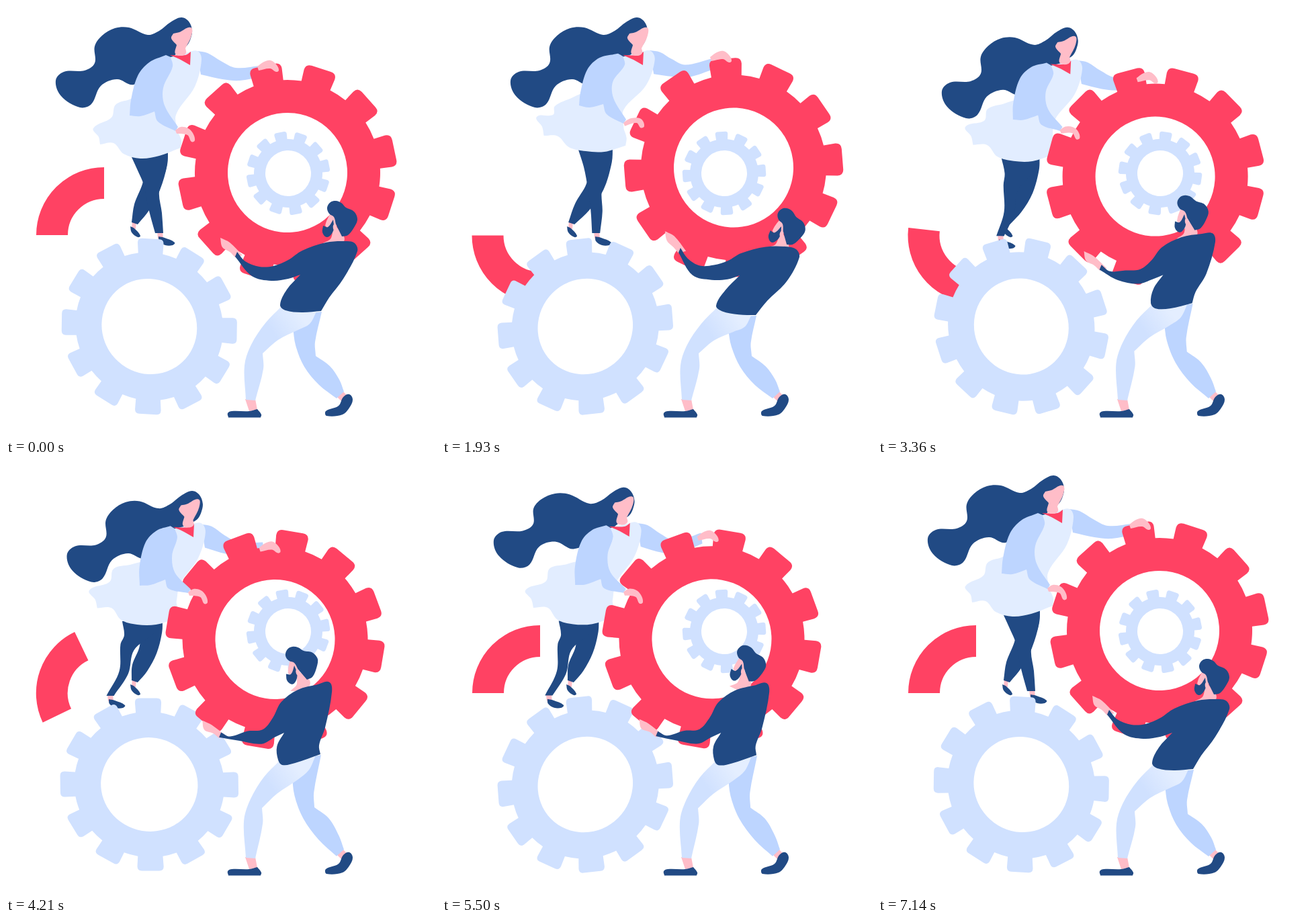
Recreate the animation shown at these times as an HTML page. Size 640x640 px, loop 7.21 s.

```html
<!DOCTYPE html>
<html lang="en">
<head>
<meta charset="utf-8">
<title>Turning gears</title>
<style>
html, body { margin: 0; width: 100%; height: 100%; overflow: hidden; background: #fff; }
svg { display: block; width: 100%; height: 100%; }
</style>
</head>
<body>
<svg id="stage" viewBox="0 0 640 640">
  <defs>
    <linearGradient id="thigh" gradientUnits="userSpaceOnUse" x1="396" y1="484" x2="436" y2="456">
      <stop offset="0" stop-color="#d0e1ff"/><stop offset="1" stop-color="#e4eeff"/>
    </linearGradient>
  </defs>
</svg>
<script>
const LOOP = 7210, TURN = 7140;
const NAVY = '#214a84', RED = '#ff4263', SKIN = '#ffbdc8',
      GEAR = '#d0e1ff', DRESS = '#e2edff', SLEEVE = '#bdd5ff';
const stage = document.getElementById('stage');
const parts = [];

function add(tag, attrs, parent = stage) {
  const el = document.createElementNS(stage.namespaceURI, tag);
  for (const name in attrs) el.setAttribute(name, attrs[name]);
  return parent.appendChild(el);
}

// Joint: rest position, then its offset when leaning right, leaning left, and
// (if different) leaning left with the hair blown up.
const joints = {
  // woman
  head: [265, 40, 29, 0, 16, 23, 10, 19],
  hairTip: [95, 120, 28, 0, 17, 25, 3, 3],
  face: [262, 50, 30, 0, 11.5, 20.5, 8.5, 17.5],
  neck: [260, 74, 25, 0, 5, 21],
  shoulder: [290, 88, 26, 0, 6, 22],
  farElbow: [330, 98, 19, -4, 6, 25],
  farCuff: [379, 97, 24, -11, 4, 28, 8, 14],
  farHand: [390, 90, 25, -14, 2.5, 35, 6, 19],
  upperArm: [189, 125, 20, -9, 11, 11],
  elbow: [184, 163, 20, -15, 15, 18],
  crook: [221, 157, 19, -11, 16, 15],
  wrist: [254, 185, 18, -11, 19, 6],
  fingers: [280, 198, 20, -21, 19, 6],
  skirtTip: [130, 182, 11, -17, -6, 6],
  skirtTop: [163, 147, 5, 2, -3, 9],
  skirtHem: [195, 227, 14, -11, -5, 12],
  hipLeft: [188, 226, 16, -11, -14, 9],
  hipRight: [250, 212, 13, -3, -8, 19],
  farKnee: [210, 270, 12, 0, -4, 7],
  farAnkle: [191, 324, 1, 0, 0, 0],
  nearKnee: [217, 280, 10, -2, -38, 0],
  nearFoot: [230, 342, 1, 0, -74, 7],
  // man
  palm: [325, 352, 13, -10, -27, 37],
  cuff: [342, 370, 11, -6, -24, 34],
  forearm: [396, 398, 7, -2, -14, 10],
  armpit: [438, 400, 5, 1, -24, 0],
  chest: [460, 356, 2, 5, -36, -14],
  nape: [490, 355, 8, 8, -51, -18],
  back: [520, 357, 9, 10, -38, -29],
  waist: [500, 407, 11, 4, -27, -14],
  hemRight: [469, 455, -2, 6, -1, -22],
  hemLeft: [409, 446, 0, 1, -3, -5],
  knee: [461, 521, 0, 0, -2, -10],
  shin: [382, 517, 0, 0, -1, -5],
  ankle: [364, 587, 0, 0, 0, 0],
  heel: [498, 579, 0, 0, 0, 0]
};

// Points are "x,y"; a trailing * marks a corner, all others are smooth.
const parse = text => text.split(' ').map(item => {
  const [x, y] = item.split(',').map(parseFloat);
  return { x, y, corner: item.endsWith('*') };
});

function control(p, prev, next, other, length) {
  if (p.corner) return `${p.x + (other.x - p.x) / 3} ${p.y + (other.y - p.y) / 3}`;
  const size = Math.hypot(next.x - prev.x, next.y - prev.y) || 1;
  const k = (other === next ? length : -length) / 3 / size;
  return `${p.x + (next.x - prev.x) * k} ${p.y + (next.y - prev.y) * k}`;
}

function outline(points) {
  const n = points.length, at = i => points[(i + n) % n];
  let d = `M${points[0].x} ${points[0].y}`;
  for (let i = 0; i < n; i++) {
    const a = at(i), b = at(i + 1), length = Math.hypot(b.x - a.x, b.y - a.y);
    d += `C${control(a, at(i - 1), b, b, length)} ${control(b, a, at(i + 2), a, length)} ${b.x} ${b.y}`;
  }
  return d + 'Z';
}

// Each point follows the joints, the nearest ones most.
function follow(p, names, pose) {
  let sum = 0, dx = 0, dy = 0;
  for (const name of names) {
    const [x, y, ...offsets] = joints[name];
    const i = pose < 3 || offsets.length > 4 ? 2 * pose - 2 : 2;
    const weight = 1 / (1 + (p.x - x) ** 2 + (p.y - y) ** 2);
    sum += weight;
    dx += weight * offsets[i];
    dy += weight * offsets[i + 1];
  }
  return { ...p, x: p.x + dx / sum, y: p.y + dy / sum };
}

const still = (fill, text, parent) => add('path', { fill, d: outline(parse(text)) }, parent);

function part(fill, names, text) {
  const rest = parse(text), list = names.split(' ');
  const poses = [rest, ...[1, 2, 3].map(pose => rest.map(p => follow(p, list, pose)))];
  parts.push({ el: add('path', { fill }), poses });
}

function gear(fill, body, tip, base, top, round, hole) {
  const foot = Math.sqrt(body * body - base * base);
  let d = '';
  for (let i = 0; i < 12; i++) {
    const c = Math.cos(i * Math.PI / 6), s = Math.sin(i * Math.PI / 6);
    const at = (x, y) => `${x * c - y * s} ${x * s + y * c}`;
    d += (i ? `A${body} ${body} 0 0 1 ` : 'M') + at(foot, -base) +
      `L${at(tip - round, -top)}Q${at(tip, -top)} ${at(tip, round - top)}` +
      `L${at(tip, top - round)}Q${at(tip, top)} ${at(tip - round, top)}L${at(foot, base)}`;
  }
  d += `A${body} ${body} 0 0 1 ${foot} ${-base}Z` +
    `M${hole} 0A${hole} ${hole} 0 1 0 ${-hole} 0A${hole} ${hole} 0 1 0 ${hole} 0Z`;
  return add('path', { fill, d, 'fill-rule': 'evenodd' });
}

const arc = add('path', { d: 'M68.5 341A77.5 77.5 0 0 1 146 263.5', fill: 'none', stroke: RED, 'stroke-width': 47 });

// woman, behind the gears
part(NAVY, 'head hairTip', '277,36 272,23 261,17 245,24 228,37 211,43 183,32 162,33 143,44 132,60 132,85 117,96 86,98 74,111 82,134 110,151 127,146 141,119 165,109 190,117 225,95 262,64 270,58 275,48');
part(SLEEVE, 'shoulder farElbow farCuff', '284,67* 300,70 320,82 342,92 378,89* 380,105* 348,111 322,109 290,102*');
part(SKIN, 'farAnkle', '188,320* 194,321* 193,332* 187,331*');
part(NAVY, 'farAnkle', '185,328* 191,331 200,342 196,344 187,337');
part(NAVY, 'hipLeft hipRight farKnee farAnkle', '213,222* 203,265 191,295 187,322* 196,325* 213,304 229,274 240,236 241,212*');
part(SKIN, 'nearFoot', '225,335* 233,335* 234,347* 226,346*');
part(NAVY, 'nearFoot', '227,343* 236,345 251,352 248,356 237,356 228,350');
part(NAVY, 'hipLeft hipRight nearKnee nearFoot', '187,225* 197,247 205,266 213,305 222,338* 234,338* 232,308 228,276 239,240 241,212*');
part(DRESS, 'neck shoulder crook skirtTop skirtTip skirtHem hipRight', '268,70* 285,67 291,80 281,120 253,162 256,188* 261,200 260,211* 228,223 200,227 175,220 160,204 140,206* 138,195 130,182 157,166 163,147 184,139* 220,120 245,76*');
part(RED, 'neck', '244,73* 267,73 275,68* 274,88* 260,80');
part(SKIN, 'face', '258,39 275,32 276,44 267,63* 268,70 262,74 252,71 254,58* 246,48 249,41*');

const blueGear = gear(GEAR, 110, 130.5, 18.3, 19.3, 6.5, 71);
const smallGear = gear(GEAR, 51, 62, 8.5, 9.3, 3.5, 34);
const redGear = gear(RED, 138, 162.5, 22.5, 24, 9, 89);

// woman, in front of the gears
part(SLEEVE, 'neck upperArm elbow crook wrist', '238,73* 213,84 196,104 186,140 184,163* 200,164 221,157* 226,172 252,186* 256,180* 236,148 234,122 248,90 245,76*');
part(SKIN, 'wrist fingers', '252,185* 260,180 271,182 278,189 281,200 276,202 270,192 254,190*');
part(SKIN, 'farHand', '374,90* 384,83 394,81 403,88 406,96 402,98 393,93 376,96*');

// man
still(SKIN, '493,582* 501,573* 508,580* 500,589*');
still(NAVY, '476,603 495,595 502,582 511,578 516,586 511,598 501,608 477,610');
still(SKIN, '356,585* 371,585* 374,601* 362,603*');
still(NAVY, '330,606 336,603 362,603 374,600* 380,608 379,612.5* 331,612.5*');
part(SLEEVE, 'hemRight knee heel', '427,478* 431,505 444,537 466,564 492,584* 503,574* 496,556 482,536 461,521* 460,500 470,455* 435,460');
part('url(#thigh)', 'hemLeft hemRight shin ankle', '410,447* 386,472 365,504 355,535 357,586* 371,587* 383,540 382,517* 405,497 435,482 452,473 462,455*');
part(SKIN, 'palm cuff', '319,345* 333,352 352,371* 341,374* 333,366 322,359');
const head = add('g', {});
still(SKIN, '486,322* 503,343 502,352 490,358 472,353* 484,345', head);
still(SKIN, '482,310* 490,314 490,330 484,335 475,327* 477,320', head);
still(NAVY, '481,309 478,300 483,292 491,290 499,293 506,300 518,306 523,317 519,328 509,341 500,343* 491,325* 488,314', head);
still(NAVY, '472,327* 479,329 487,318* 488,331 484,340 477,344 471,337', head);
add('ellipse', { cx: 489.5, cy: 329, rx: 2.8, ry: 4.5, fill: SKIN }, head);
part(NAVY, 'cuff forearm armpit chest nape back waist hemRight hemLeft', '344,366* 356,380 377,388 398,387 420,378 441,364 476,352 506,350 519,353 523,365 502,406 481,434 469,454* 440,456 416,453 408,445 418,422 438,400* 420,406 395,409 366,402 341,373*');

// Each key is [time, value]; values ease in and out between keys.
const poseKeys = [[620, 0], [1600, 1], [2500, 1], [3950, 2], [4100, 2], [5300, 3], [6750, 4]];
const arcKeys = [[0, 0], [1850, -90], [3070, -90], [4830, 0]];
// x, y and angle
const redPoses = [[419, 248, 18], [434, 240.5, 25.5], [400.5, 261, 9.5]];
const headPoses = [[0, 0, 0], [16, 12, 11], [-56, -21, -15], [-44, -20.5, 6]];

function track(keys, t) {
  const next = keys.findIndex(k => k[0] > t);
  if (next === 0) return keys[0][1];
  if (next < 0) return keys[keys.length - 1][1];
  const [t0, a] = keys[next - 1], [t1, b] = keys[next];
  const u = (t - t0) / (t1 - t0);
  return a + (b - a) * u * u * (3 - 2 * u);
}

function draw(t) {
  const pose = track(poseKeys, t), from = Math.floor(pose) % 4, to = (from + 1) % 4, f = pose % 1;
  const mix = (a, b) => a + (b - a) * f;
  const pick = (poses, i) => poses[Math.min(i, poses.length - 1)];
  const blend = poses => {
    const b = pick(poses, to);
    return pick(poses, from).map((v, i) => mix(v, b[i]));
  };
  for (const { el, poses } of parts) {
    el.setAttribute('d', outline(poses[from].map((p, i) => {
      const q = poses[to][i];
      return { x: mix(p.x, q.x), y: mix(p.y, q.y), corner: p.corner };
    })));
  }
  const place = (el, transform) => el.setAttribute('transform', transform);
  const turn = 360 * t / TURN;
  const [rx, ry, angle] = blend(redPoses), [hx, hy, tilt] = blend(headPoses);
  place(arc, `rotate(${track(arcKeys, t)} 146 341.5)`);
  // the big blue gear is very slightly oval
  place(blueGear, `translate(213.3 477) rotate(${47 - turn}) scale(1.018 .982) rotate(-45)`);
  place(smallGear, `translate(420 249) rotate(${18.7 + turn})`);
  place(redGear, `translate(${rx} ${ry}) rotate(${angle})`);
  place(head, `translate(${hx} ${hy}) rotate(${tilt} 498 328)`);
}

const start = performance.now();
function tick() {
  draw(Math.min((performance.now() - start) % LOOP, TURN));
  requestAnimationFrame(tick);
}
tick();
</script>
</body>
</html>
```
